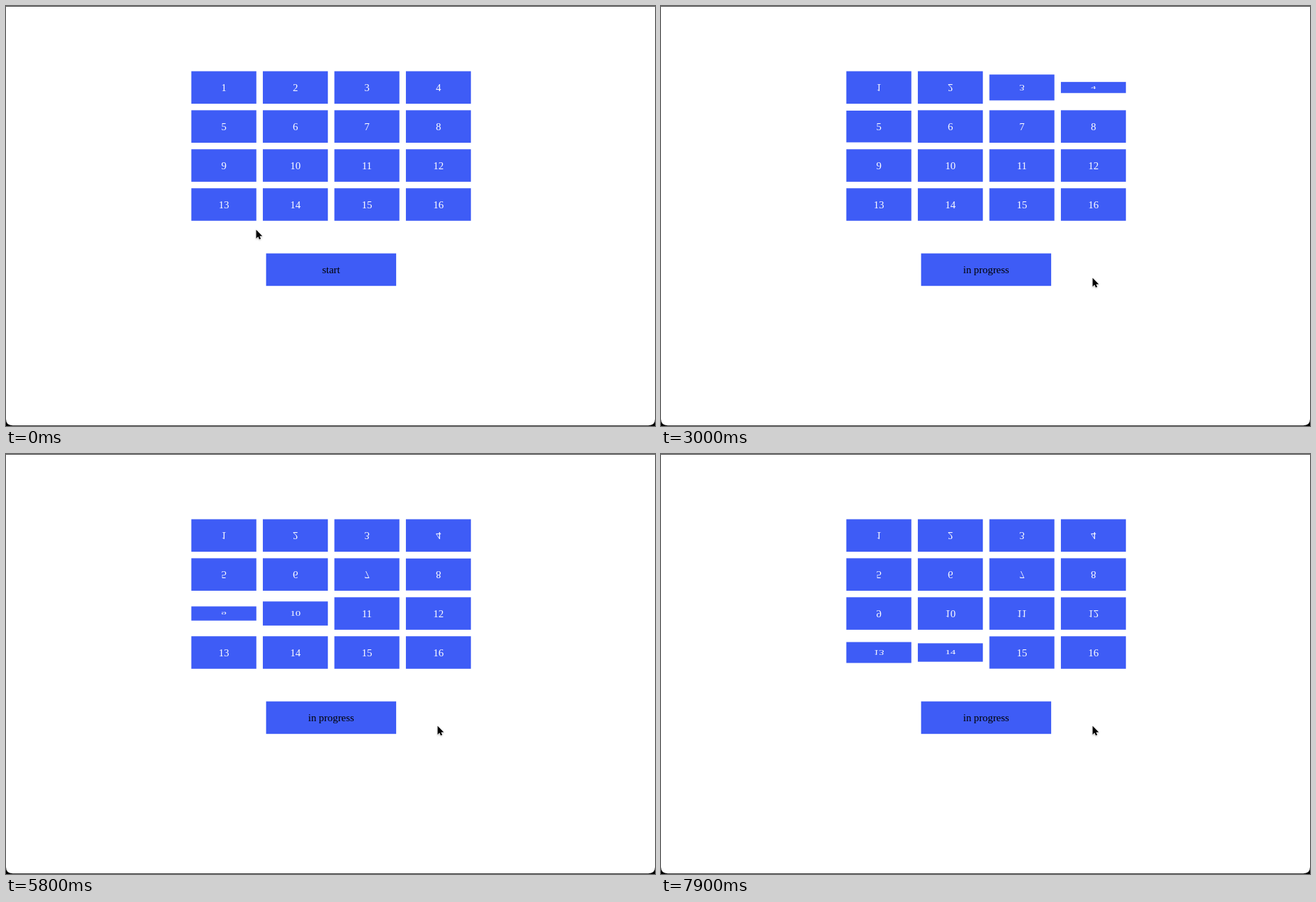
Recreate the animation shown at these times as an HTML page. Size 930 px wide and 602 px high, loop 8000 ms.

```html
<!DOCTYPE html>
<html lang="en">
<head>
<meta charset="utf-8">
<title>Flip grid</title>
<style>
  html, body { margin: 0; width: 100%; height: 100%; overflow: hidden; background: #000; }
  svg { display: block; width: 930px; height: 602px; }
  text { font: 14.91px "Liberation Serif", "Times New Roman", serif; text-anchor: middle; }
  .tile, .button rect { fill: #3e5cf6; }
  .card text { fill: #fff; }
  .arrow { fill: #000; stroke: #fff; stroke-width: 1; paint-order: stroke; filter: drop-shadow(0 1px 1px rgba(0, 0, 0, .25)); }
  .beam { fill: none; stroke: #000; stroke-width: 1.1; }
  .beam .rim { stroke: #fff; stroke-width: 3; stroke-linecap: square; }
</style>
</head>
<body>
<svg viewBox="0 0 930 602">
  <rect width="930" height="20" fill="#4a4a4a"/>
  <path d="M0 1H930V592Q930 601.2 920.5 601.2H9.5Q0 601.2 0 592Z" fill="#fff"/>
  <g id="grid"></g>
  <g class="button">
    <rect x="372.7" y="354.6" width="186.4" height="46.6"/>
    <text id="label" x="465.9" y="382.9">start</text>
  </g>
  <g id="cursor">
    <path id="arrow" class="arrow" d="M.5 .7V13.2L3.3 10.6L5 14.4L7.1 13.5L5.4 9.8H9.3Z"/>
    <g id="beam" class="beam">
      <path class="rim"/>
      <path class="core"/>
    </g>
  </g>
</svg>
<script>
const LOOP = 8000, STEP = 100;
const CLICK = 630, STAGGER = 500, FLIP = 2000;
const W = 93.18, H = 46.59, GAP = 9.32, LEFT = 265.55, TOP = 93.5;
const NS = "http://www.w3.org/2000/svg";
const $ = id => document.getElementById(id);

// pointer path: time, x, y
const path = [
  [0, 358, 320], [100, 364, 324], [200, 400, 340], [300, 446, 364], [400, 467, 379.3],
  [1600, 467, 379.3], [1700, 482, 380], [1800, 525, 383], [1900, 575, 387],
  [2000, 608, 389], [2100, 618, 389]
];

const add = (parent, tag, attrs) => {
  const el = document.createElementNS(NS, tag);
  for (const key in attrs) el.setAttribute(key, attrs[key]);
  return parent.appendChild(el);
};

const cards = Array.from({ length: 16 }, (_, i) => {
  const x = LEFT + W / 2 + (i % 4) * (W + GAP);
  const y = TOP + H / 2 + Math.floor(i / 4) * (H + GAP);
  const el = add($("grid"), "g", { class: "card" });
  add(el, "rect", { class: "tile", x: -W / 2, y: -H / 2, width: W, height: H });
  add(el, "text", { y: 5.03 }).textContent = i + 1;
  return { el, x, y, start: CLICK + i * STAGGER };
});

const beamShape = "M-3.2 -7.2Q0 -7.2 0 -4.8V4.8Q0 7.2 -3.2 7.2M3.2 -7.2Q0 -7.2 0 -4.8M0 4.8Q0 7.2 3.2 7.2M-2 2.6H2";
for (const p of $("beam").children) p.setAttribute("d", beamShape);

// cubic-bezier(.42, 0, .58, 1)
function easeInOut(p) {
  if (p <= 0) return 0;
  if (p >= 1) return 1;
  let lo = 0, hi = 1, u = p;
  for (let i = 0; i < 24; i++) {
    u = (lo + hi) / 2;
    const x = 1.26 * u * (1 - u) ** 2 + 1.74 * u * u * (1 - u) + u ** 3;
    if (x < p) lo = u; else hi = u;
  }
  return u * u * (3 - 2 * u);
}

function pointer(t) {
  const i = path.findIndex(k => k[0] > t);
  if (i < 0) return path[path.length - 1].slice(1);
  const [t0, x0, y0] = path[i - 1], [t1, x1, y1] = path[i];
  const p = (t - t0) / (t1 - t0);
  return [x0 + (x1 - x0) * p, y0 + (y1 - y0) * p];
}

function draw(t) {
  for (const { el, x, y, start } of cards) {
    const squash = Math.cos(Math.PI * easeInOut((t - start) / FLIP));
    el.setAttribute("transform", `translate(${x} ${y}) scale(1 ${squash.toFixed(4)})`);
  }
  $("label").textContent = t < CLICK ? "start" : "in progress";

  const [x, y] = pointer(t);
  const overText = x > 432 && x < 499 && y > 370 && y < 388;
  $("cursor").setAttribute("transform", `translate(${x} ${y})`);
  $("arrow").style.display = overText ? "none" : "";
  $("beam").style.display = overText ? "" : "none";
}

const begin = performance.now();
function tick() {
  const t = (performance.now() - begin) % LOOP;
  draw(Math.floor(t / STEP) * STEP);
  requestAnimationFrame(tick);
}
tick();
</script>
</body>
</html>
```
